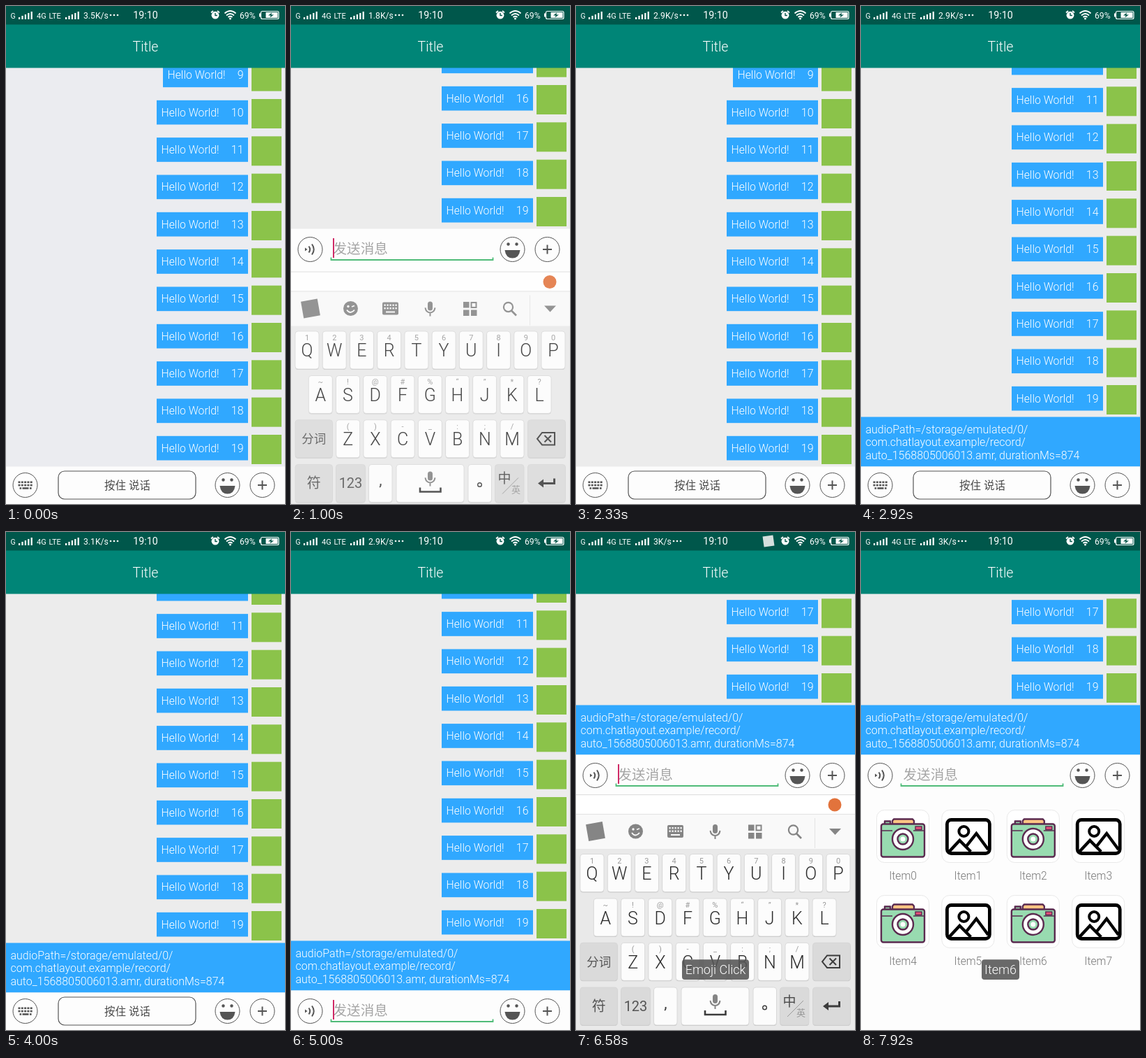
Recreate the animation shown at these times as an HTML page. Size 400 by 712 pixels, loop 8000 ms.

```html
<!DOCTYPE html>
<html lang="zh">
<head>
<meta charset="utf-8">
<title>Chat layout</title>
<style>
html, body { margin: 0; width: 100%; height: 100%; overflow: hidden; background: #ececec; }
svg { display: block; width: 100%; height: 100%; }
text { font-family: Roboto, "Noto Sans CJK SC", "Noto Sans CJK", sans-serif; white-space: pre; }
.light { font-weight: 300; }
</style>
</head>
<body>
<svg id="stage" viewBox="0 0 400 712" xmlns="http://www.w3.org/2000/svg"></svg>
<script>
const LOOP = 8000, STEP = 1000 / 12, INK = '#555';

// Markup helpers
const rect = (x, y, w, h, fill, rest = '') =>
  `<rect x="${x}" y="${y}" width="${w}" height="${h}" fill="${fill}" ${rest}/>`;
const circle = (x, y, r, fill, rest = '') =>
  `<circle cx="${x}" cy="${y}" r="${r}" fill="${fill}" ${rest}/>`;
const path = (d, fill, rest = '') => `<path d="${d}" fill="${fill}" ${rest}/>`;
const line = (d, color, width = 1) => path(d, 'none', `stroke="${color}" stroke-width="${width}"`);
const text = (x, y, size, fill, str, rest = '') =>
  `<text x="${x}" y="${y}" font-size="${size}" fill="${fill}" ${rest}>${str}</text>`;
const mid = 'text-anchor="middle"', thin = 'class="light"';
const group = (id, body, rest = '') => `<g id="${id}" ${rest}>${body}</g>`;
const at = (x, y, body) => `<g transform="translate(${x} ${y})">${body}</g>`;
const range = n => [...Array(n).keys()];

// Message list, with its bottom edge at y = 0
function row(i) {
  const y = -26.5 - 160 / 3 * (19 - i), left = i < 10 ? 225 : 216;
  return rect(left, y - 17.2, 347 - left, 34.7, '#30a8ff') +
    text(left + 6.5, y + 5.8, 15.8, '#fff', 'Hello World!', thin) +
    text(340.5, y + 5.8, 16, '#fff', i, thin + ' text-anchor="end"') +
    rect(352, y - 19, 43, 42, '#8bc34a');
}
const audioLines = ['audioPath=/storage/emulated/0/', 'com.chatlayout.example/record/',
  'auto_1568805006013.amr, durationMs=874'];
const list = group('rows', range(15).map(k => row(k + 5)).join('')) +
  group('audio', rect(0, -71, 400, 71, '#30a8ff') +
    audioLines.map((s, k) => text(6.5, -47.3 + 18.2 * k, 16, '#fff', s, thin)).join(''));

// Input bar, with its button centres at y = 0
const ring = (id, x) => circle(x, 0, 17.5, '#fdfdfd', `id="${id}" stroke="${INK}"`);
const keyDots = [-5.5, -1.2].map(y => range(5).map(k => rect(17.5 + 4.3 * k, y, 3, 2.6, INK)).join('')).join('') +
  rect(19.5, 3.2, 2.6, 2.6, INK) + rect(23.5, 3.2, 9, 2.6, INK) + rect(34, 3.2, 2.6, 2.6, INK);
const bar =
  group('voiceMode',
    rect(0, -26.5, 400, 54, '#fdfdfd') + circle(27.5, 0, 17.5, '#fdfdfd', `stroke="${INK}"`) + keyDots +
    rect(75, -20, 197, 40, '#fdfdfd', `rx="9" stroke="${INK}" stroke-width="1.2"`) +
    text(174, 5.8, 15.5, '#4a4a4a', '按住 说话', mid)) +
  group('textMode',
    rect(0, -29.5, 400, 57, '#fdfdfd') + ring('speak', 27.5) +
    path('M20 -2.5L23.5 0L20 2.5Z', INK) +
    line('M25.5 -4.5Q29 0 25.5 4.5M30 -7.5Q35.5 0 30 7.5', INK, 2) +
    text(60.5, 5.8, 19.6, '#a5a5a5', '发送消息', thin) +
    line('M57.5 11.5V15H289.5V11.5', '#4fbb78', 1.8) +
    rect(60, -16, 2, 28, '#d02a66', 'id="caret"')) +
  ring('smile', 317.5) + circle(311.5, -7.5, 2.2, INK) + circle(323.5, -7.5, 2.2, INK) +
  path('M306.5 1H328.5Q327 12.5 317.5 12.5T306.5 1Z', INK) +
  ring('plus', 367.5) + line('M361 0H374M367.5 -6.5V6.5', INK, 2);

// Attachment panel
const plum = 'stroke="#5b2b50" stroke-width="2.4" stroke-linejoin="round"';
const camera = rect(-26, -21.5, 8, 5, '#98dbb0', plum) +
  path('M-15 -17V-22L-13 -24.5H14L16 -22V-17Z', '#ffc583', plum) +
  rect(-31, -17.5, 62, 47, '#98dbb0', 'rx="3" ' + plum) +
  line('M-31 -8H-15M15 -8H31', '#5b2b50', 1.6) +
  circle(0, 4, 15, '#fff', plum) + circle(0, 4, 7.5, '#98dbb0', plum) + circle(0, 4, 3.5, '#fff') +
  rect(18, -14, 9, 4.5, '#e8507a', 'stroke="#5b2b50" stroke-width="1.4"');
const picture = rect(-30, -23.5, 61, 48, 'none', 'rx="6" stroke="#000" stroke-width="4.8"') +
  circle(-6, -7, 7, 'none', 'stroke="#000" stroke-width="4"') +
  line('M-27 22L-12 6L-3 15L12 -4L29 19M-3 15L4 22', '#000', 4.4);
const item = i => at(60 + 93.4 * (i % 4), i < 4 ? 435 : 557,
  rect(-37.5, -37.5, 75, 75, '#fff', 'rx="11" stroke="#e9e9e9"') +
  (i % 2 ? picture : camera) + text(0, 61.5, 15.6, '#777', 'Item' + i, mid + ' ' + thin));
const panel = rect(0, 375, 400, 337, '#fdfdfd') + group('items', range(8).map(item).join(''));

// Soft keyboard
const GREY = '#858585', DARK = '#3c3c3c';
const key = (x, y, w, dark) =>
  rect(x, y + 1, w, 54, '#c9c9c9', 'rx="4"') +
  rect(x, y, w, 54, dark ? '#dadada' : '#fcfcfc', 'rx="4" stroke="#d4d4d4" stroke-width=".8"');
const letters = (chars, hints, x0, y) => [...chars].map((c, k) => {
  const x = x0 + 39.22 * k;
  return key(x - 17, y, 34) + text(x, y + 13, 11, '#999', hints[k], mid) +
    text(x, y + 36.5, 25, '#2c2c2c', c, mid + ' ' + thin);
}).join('');
const mic = (x, y) => rect(x - 3.5, y - 10, 7, 13, GREY, 'rx="3.5"') +
  line(`M${x - 7} ${y - 1}Q${x - 6} ${y + 6} ${x} ${y + 6}T${x + 7} ${y - 1}M${x} ${y + 6}V${y + 11}`, GREY, 2);
const toolbar =
  rect(0, 375, 400, 29, '#fff') + rect(0, 375, 400, 1.2, '#e0e0e0') + circle(371, 390, 9.5, '#e2733c') +
  rect(0, 403, 400, 50, '#f9f9f9') + rect(0, 403, 400, 1, '#e2e2e2') +
  rect(16, 416, 24, 24, GREY, 'transform="rotate(-10 28 428)"') +
  circle(85.5, 428, 10.5, GREY) + circle(82, 425, 1.7, '#f9f9f9') +
  line('M87 425.5L91 424M80 430Q85 437 91 430', '#f9f9f9', 1.8) +
  rect(131, 419, 23, 18, GREY, 'rx="2"') +
  [422, 426.5].map(y => range(5).map(k => rect(133.5 + 4 * k, y, 2.2, 2.4, '#f9f9f9')).join('')).join('') +
  rect(136, 432, 13, 2, '#f9f9f9') + mic(199.5, 428) +
  rect(247, 418.5, 8.5, 8.5, GREY) + rect(258.5, 419.5, 7, 7, 'none', `stroke="${GREY}" stroke-width="2"`) +
  rect(247, 430, 8.5, 8.5, GREY) + rect(258, 430, 8.5, 8.5, GREY) +
  circle(311.5, 426, 6.6, 'none', `stroke="${GREY}" stroke-width="2.2"`) + line('M316 431L323 438', GREY, 2.6) +
  rect(342, 409, 1, 43, '#e4e4e4') + path('M363 424H380L371.5 433Z', GREY);
const keyboard = toolbar + rect(0, 453, 400, 270, '#e9e9e9') +
  letters('QWERTYUIOP', '1234567890', 23, 460.5) +
  letters('ASDFGHJKL', '~!@#%“”*?', 42.3, 524) +
  letters('ZXCVBNM', '()-_:;/', 81.7, 587.3) +
  key(6, 587.3, 53.5, 1) + text(32.7, 621, 17.5, '#555', '分词', mid) +
  key(339.5, 587.3, 54, 1) +
  path('M353 614.3L360 605.5H378V623H360Z', 'none', `stroke="${DARK}" stroke-width="2"`) +
  line('M363.5 609.5L373 619M373 609.5L363.5 619', DARK, 2) +
  key(6, 651, 53.5, 1) + text(32.7, 685, 20, '#555', '符', mid) +
  key(64.5, 651, 42, 1) + text(85.5, 685, 20, '#555', '123', mid) +
  key(111.5, 651, 33.5) + text(128.5, 681, 22, DARK, ',', mid) +
  key(151, 651, 97) + mic(199.5, 671) + line('M185 684V690H214.5V684', DARK, 2.6) +
  key(254, 651, 33.5) + circle(270.5, 680, 2.8, 'none', `stroke="${DARK}" stroke-width="1.4"`) +
  key(292.5, 651, 41.5, 1) + text(306, 678, 19, '#4a4a4a', '中', mid) +
  text(322.5, 692, 13, '#999', '英', mid) + line('M303 693L326 670', '#999') +
  key(339.5, 651, 54, 1) + path('M354 678L362 672V676.5H376V671H379V679.5H362V684Z', DARK);

// Status and title bars
const signal = x => range(5).map(k => rect(x + 4.4 * k, 16 - 2 * k, 2.2, 3 + 2 * k, '#fff')).join('');
const header = rect(0, 0, 400, 88.5, '#008577') + rect(0, 0, 400, 26.5, '#00574b') +
  text(6.5, 18, 10.5, '#fff', 'G') + signal(18) +
  text(44, 18, 11, '#fff', '4G') + text(61.5, 18, 11, '#fff', 'LTE') + signal(85) +
  text(111, 17.7, 12.2, '#fff', '', 'id="speed"') +
  group('dots', range(3).map(k => circle(2 + 5 * k, 13, 1.3, '#fff')).join('')) +
  text(200, 18.3, 14.2, '#fff', '19:10', mid) +
  rect(268.5, 5.5, 15, 15, '#d5dfdd', 'id="badge" transform="rotate(-8 276 13)"') +
  circle(300, 13.2, 5.4, '#fff') + line('M300 10V13.5H303', '#00574b', 1.4) +
  line('M294 9.5L297 7M303 7L306 9.5', '#fff', 1.8) +
  line('M313.5 10.5Q321.5 3.5 329.5 10.5M316 13.5Q321.5 8.5 327 13.5M318.5 16Q321.5 13.5 324.5 16', '#fff', 1.7) +
  circle(321.5, 18, 1.5, '#fff') + text(335, 17.7, 12.2, '#fff', '69%') +
  rect(365.5, 7.5, 25.5, 11, 'none', 'rx="2" stroke="#fff" stroke-width="1.2"') + rect(363, 10.5, 2, 5, '#fff') +
  rect(372.5, 9, 17, 8, '#fff') + path('M381 9.5L376 13.5H379.5L378.5 16.5L384 12.5H380.5Z', '#00574b') +
  text(200, 65, 19.6, '#fff', 'Title', mid + ' ' + thin);

const toast = (id, str, w) => group(id, rect(200 - w / 2, 611.3, w, 28.7, '#555', 'rx="4" fill-opacity=".88"') +
  text(200, 632, 18, '#fff', str, mid + ' ' + thin));

document.getElementById('stage').innerHTML =
  rect(0, 0, 400, 712, '#ececec', 'id="back"') + group('list', list) + group('panel', panel) + group('bar', bar) +
  group('keyboard', keyboard) + header + toast('emojiToast', 'Emoji Click', 96) + toast('itemToast', 'Item6', 54);

const el = {};
document.querySelectorAll('[id]').forEach(node => el[node.id] = node);
const set = (id, name, value) => el[id].setAttribute(name, value);
const show = (id, on) => set(id, 'visibility', on ? 'visible' : 'hidden');
const move = (id, y, x = 0) => set(id, 'transform', `translate(${x} ${y})`);
const within = (n, a, b) => n >= a && n < b;
const ramp = (n, from, length) => Math.min(1, Math.max(0, (n - from) / length));
const pressed = on => on ? '#d6d6d6' : '#fdfdfd';

// Keyboard visits as [shown, hidden] start steps; both moves are short quintic eases
const visits = [[11.4, 19.8], [60.4, 66.8], [73.4, 80.8]];
const MOVE = 1.8;
function keyboardAway(n) {
  const visit = visits.find(([from, to]) => within(n, from, to + MOVE));
  if (!visit) return 1;
  return Math.max((1 - ramp(n, visit[0], MOVE)) ** 5, ramp(n, visit[1], MOVE) ** 5);
}
const speeds = [[0, '3.5'], [7, '1.8'], [25, '2.9'], [39, '3.1'], [59, '2.9'], [76, '3']];

function draw(time) {
  const n = Math.floor((time % LOOP + 6) / STEP);
  const typing = within(n, 11, 19) || n >= 59;
  const raised = within(n, 12, 22) || n >= 61;
  const sent = n >= 34;
  const bottom = raised ? 375 : 712;

  set('back', 'fill', n < 7 ? '#ebecf0' : '#ececec');
  move('list', bottom - (typing ? 56.5 : 53.5));
  move('rows', sent ? -71 : 0);
  show('audio', sent);
  move('bar', bottom - 27);
  show('voiceMode', !typing);
  show('textMode', typing);
  set('caret', 'opacity', n < 85 ? 1 : 0);
  set('speak', 'fill', pressed(within(n, 17, 19)));
  set('smile', 'fill', pressed(within(n, 66, 69)));
  set('plus', 'fill', pressed(within(n, 80, 83)));

  set('panel', 'display', raised ? 'inline' : 'none');
  set('items', 'display', n >= 81 ? 'inline' : 'none');
  const away = keyboardAway(n);
  move('keyboard', 34 * away);
  set('keyboard', 'opacity', 1 - away);

  const speed = speeds.filter(s => s[0] <= n).pop()[1];
  el.speed.textContent = speed + 'K/s';
  move('dots', 0, speed.length > 1 ? 148 : 138);
  // The status badge follows the keyboard with a short delay
  show('badge', visits.some(([from, to]) => within(n, from + 2, to)));
  set('emojiToast', 'opacity', ramp(n, 69, 4) - ramp(n, 86, 3));
  set('itemToast', 'opacity', ramp(n, 88, 4));
}

const start = performance.now();
function tick() {
  draw(performance.now() - start);
  requestAnimationFrame(tick);
}
tick();
</script>
</body>
</html>
```
